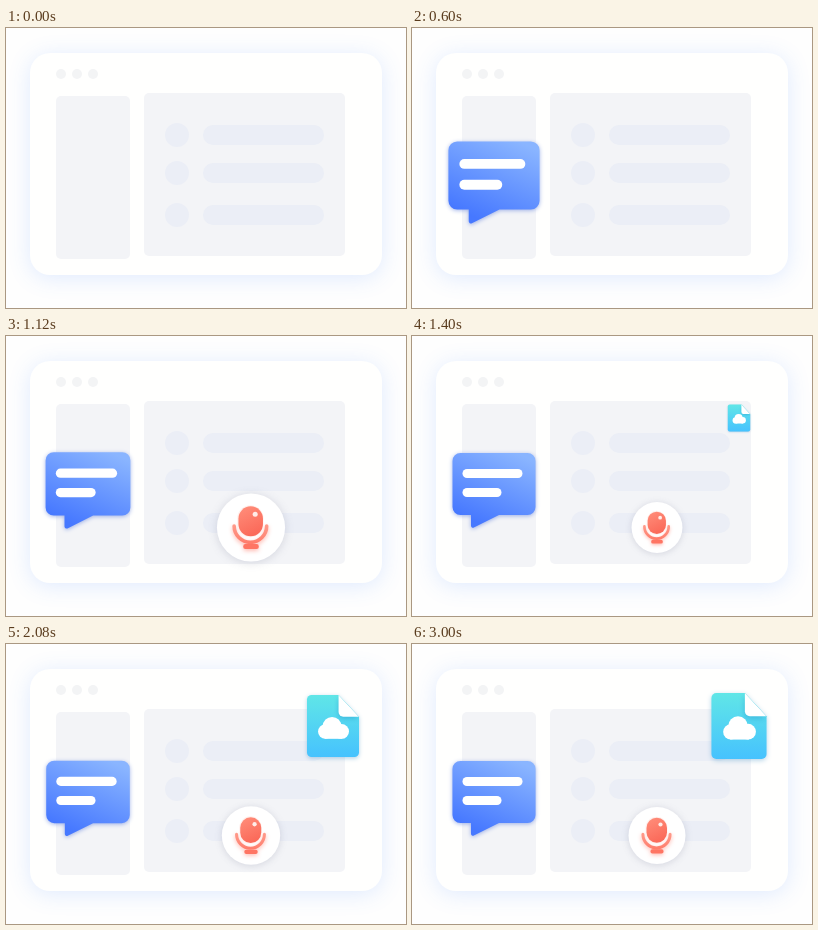
Animation, 400 px wide and 280 px high, one loop 5 s. Source, as an HTML page with a canvas:

```html
<!DOCTYPE html>
<html lang="en">
<head>
<meta charset="utf-8">
<title>Window with popping icons</title>
<style>
  html, body { margin: 0; width: 100%; height: 100%; overflow: hidden; background: #fefefe; }
  canvas { display: block; width: 400px; height: 280px; }
</style>
</head>
<body>
<canvas id="stage"></canvas>
<script>
const W = 400, H = 280, LOOP = 5000, STEP = 40, REST = 3000;
const canvas = document.getElementById('stage');
const ctx = canvas.getContext('2d');
const dpr = window.devicePixelRatio || 1;
canvas.width = W * dpr;
canvas.height = H * dpr;

// Linear growth, then a decaying bounce at 2 Hz.
function popScale(ms) {
  const grow = 400;
  if (ms <= 0) return 0;
  if (ms < grow) return ms / grow;
  const t = (ms - grow) / 1000;
  return 1 + 0.25 * Math.sin(4 * Math.PI * t) * Math.exp(-2 * t);
}

function shadow(color, blur, dy, scale = 1) {
  ctx.shadowColor = color;
  ctx.shadowBlur = blur * scale * dpr;
  ctx.shadowOffsetY = dy * scale * dpr;
}

function noShadow() {
  ctx.shadowColor = 'transparent';
}

function box(x, y, w, h, r, fill) {
  ctx.beginPath();
  ctx.roundRect(x, y, w, h, r);
  ctx.fillStyle = fill;
  ctx.fill();
}

function disc(x, y, r, fill) {
  ctx.beginPath();
  ctx.arc(x, y, r, 0, Math.PI * 2);
  ctx.fillStyle = fill;
  ctx.fill();
}

function gradient(x0, y0, x1, y1, from, to) {
  const g = ctx.createLinearGradient(x0, y0, x1, y1);
  g.addColorStop(0, from);
  g.addColorStop(1, to);
  return g;
}

function drawWindow() {
  shadow('rgba(70, 135, 255, 0.17)', 22, 3);
  box(24, 25, 352, 222, 20, '#fffffe');
  noShadow();
  for (const x of [55, 71, 87]) disc(x, 46, 5, '#f3f4f5');
  box(50, 68, 74, 163, 5, '#f3f4f7');
  box(138, 65, 201, 163, 5, '#f3f4f7');
  for (const y of [107, 145, 187]) {
    disc(171, y, 12, '#ebeef6');
    box(197, y - 10, 121, 20, 10, '#ebeef6');
  }
}

function drawBubble(s) {
  const l = -41.5, r = 41.5, t = -36.5, b = 25.5, tail = -23;
  ctx.beginPath();
  ctx.moveTo(0, t);
  ctx.arcTo(r, t, r, b, 8);
  ctx.arcTo(r, b, l, b, 8);
  ctx.lineTo(5, b);
  ctx.arcTo(tail, 39.5, tail, b, 2);
  ctx.lineTo(tail, b);
  ctx.arcTo(l, b, l, t, 8);
  ctx.arcTo(l, t, r, t, 8);
  ctx.closePath();
  ctx.fillStyle = gradient(22, t, -10, 36, '#8ab5ff', '#4678ff');
  shadow('rgba(50, 90, 210, 0.45)', 4, 1, s);
  ctx.fill();
  noShadow();
  box(-31.5, -20.5, 60, 9, 4.5, '#fff');
  box(-31.5, -1.5, 39, 9, 4.5, '#fff');
}

function drawMic(s) {
  shadow('rgba(120, 125, 150, 0.25)', 7, 1, s);
  disc(0, 0, 28.5, '#fff');
  shadow('rgba(255, 100, 80, 0.45)', 4, 1.5, s);

  ctx.beginPath();
  ctx.arc(-0.5, -1.2, 13.6, 0, Math.PI);
  ctx.lineWidth = 3;
  ctx.lineCap = 'round';
  ctx.strokeStyle = gradient(0, -2, 0, 13, '#ff9a8a', '#ff7e6d');
  ctx.stroke();
  box(-6.5, 13.8, 13, 4.2, 1.8, '#ff7563');
  noShadow();

  box(-11.5, -18.7, 22, 27, 11, '#fff0ed');
  box(-10.5, -17.7, 20.5, 25, 10.2, gradient(-6, -17, 6, 7, '#ff8b78', '#fa6656'));
  disc(3.5, -11, 2.1, '#ffece8');
}

function drawCloudFile(s) {
  const l = -28, r = 28, t = -33.5, b = 33.5, fx = 6, fy = -10;
  const page = new Path2D();
  page.moveTo(l, 0);
  page.arcTo(l, t, fx, t, 5);
  page.lineTo(fx, t);
  page.lineTo(r, fy);
  page.arcTo(r, b, l, b, 5);
  page.arcTo(l, b, l, 0, 5);
  page.closePath();
  shadow('rgba(40, 130, 190, 0.35)', 5, 1.5, s);
  ctx.fillStyle = gradient(0, t, 0, b, '#60e6e7', '#46c2fe');
  ctx.fill(page);

  ctx.save();
  ctx.clip(page);
  ctx.beginPath();
  ctx.moveTo(fx, t);
  ctx.arcTo(fx, fy, r, fy, 5);
  ctx.lineTo(r, fy);
  ctx.closePath();
  ctx.fillStyle = '#fff';
  shadow('rgba(20, 130, 190, 0.4)', 6, 2, s);
  ctx.fill();
  ctx.restore();
  noShadow();

  disc(-1, 0.2, 10, '#fff');
  disc(-8.3, 6, 7.8, '#fff');
  disc(9.2, 5.8, 8, '#fff');
  box(-9, 2, 19, 11.8, 0, '#fff');
}

const pops = [
  { start: 0, x: 82, y: 153.5, draw: drawBubble },
  { start: 600, x: 245, y: 191.5, draw: drawMic },
  { start: 1240, x: 327, y: 82, draw: drawCloudFile },
];

function render(ms) {
  const time = Math.min(Math.floor(ms / STEP) * STEP, REST);
  ctx.setTransform(dpr, 0, 0, dpr, 0, 0);
  ctx.fillStyle = '#fefefe';
  ctx.fillRect(0, 0, W, H);
  drawWindow();
  for (const p of pops) {
    const s = popScale(time - p.start);
    if (!s) continue;
    ctx.save();
    ctx.translate(p.x, p.y);
    ctx.scale(s, s);
    p.draw(s);
    ctx.restore();
  }
}

let origin = null;
function tick() {
  const now = performance.now();
  if (origin === null) origin = now;
  render((now - origin) % LOOP);
  requestAnimationFrame(tick);
}
tick();
</script>
</body>
</html>
```
